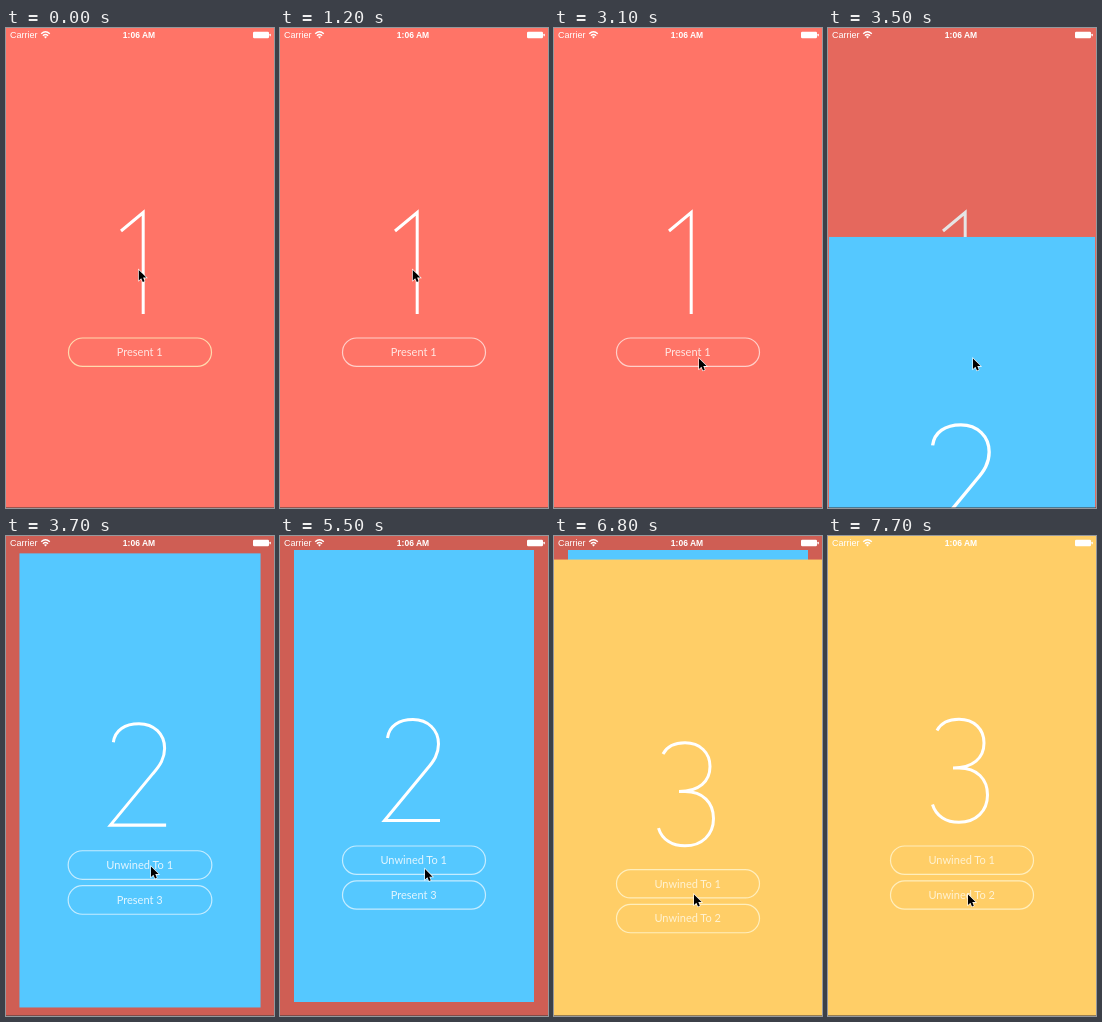
An HTML page for the animation above (8000 ms loop, 268 by 480 pixels).

```html
<!DOCTYPE html>
<html lang="en">
<head>
<meta charset="utf-8">
<title>Card transitions</title>
<style>
  html, body { margin: 0; width: 100%; height: 100%; overflow: hidden; background: #ff7467; }
  svg { display: block; width: 268px; height: 480px; }
  .label { font: 11px Lato, sans-serif; text-anchor: middle; }
  .digit { fill: none; stroke: #fff; stroke-width: 3; stroke-linejoin: miter; }
  .status { font: 9px "Liberation Sans", sans-serif; fill: #fff; }
  .clock { font-size: 8.5px; font-weight: bold; text-anchor: middle; }
  .pill { fill: none; stroke-width: 1.2; }
</style>
</head>
<body>
<svg viewBox="0 0 268 480">
  <rect width="268" height="480" fill="#ff7467"/>
  <g id="one">
    <path class="digit" d="M115 203L137.2 184.5V286"/>
  </g>
  <rect id="dim" width="268" height="480" opacity="0"/>
  <g id="two">
    <rect x="14" y="14" width="240" height="452" fill="#55c8ff"/>
    <path class="digit" d="M107.500 202C109 190 119 183.500 133 183.500C148 183.500 158.500 194 158.500 208C158.500 218 154 225 147 233L104.500 284.500H160"/>
  </g>
  <g id="three">
    <rect width="268" height="481" fill="#ffce67"/>
    <path class="digit" d="M109 194.500C113 187 121 183.300 131 183.300C146 183.300 156 193 156 207C156 222 145 232 125 232H131C149 232 159.500 243 159.500 259C159.500 275 148 286.300 131 286.300C118 286.300 108 280 104.500 268.500"/>
  </g>
  <g class="status">
    <text x="4" y="10">Carrier</text>
    <text class="clock" x="133" y="10">1:06 AM</text>
    <g fill="none" stroke="#fff" stroke-width="1.4">
      <path d="M35.200 5.800Q39.500 1.800 43.800 5.800M36.900 7.700Q39.500 5.300 42.100 7.700"/>
    </g>
    <path d="M38 8.800Q39.500 7.500 41 8.800L39.500 10.400Z"/>
    <rect x="247" y="3.700" width="16" height="6.600" rx="1.200"/>
    <rect x="263.500" y="5.700" width="1.300" height="2.600" rx=".6"/>
  </g>
  <rect y="479" width="268" height="1" fill="#443c3c" opacity=".55"/>
  <path id="cursor" d="M0 0V10.500L2.400 8.300L4 12L5.800 11.200L4.300 7.600H7.600Z" fill="#000" stroke="#fff" stroke-width="1.200" paint-order="stroke"/>
</svg>
<script>
const LOOP = 8000;
const $ = id => document.getElementById(id);
const [one, two, three, dim, cursor] = ['one', 'two', 'three', 'dim', 'cursor'].map($);

function make(parent, tag, attrs, text = '') {
  const el = document.createElementNS('http://www.w3.org/2000/svg', tag);
  for (const key in attrs) el.setAttribute(key, attrs[key]);
  el.textContent = text;
  return parent.appendChild(el);
}

function button(parent, y, text, line, ink) {
  make(parent, 'text', { class: 'label', x: 133.7, y: y + 18, fill: ink }, text);
  return make(parent, 'rect', {
    class: 'pill', x: 62.5, y, width: 143, height: 28.4, rx: 14.2, stroke: line
  });
}

const firstPill = button(one, 310, 'Present 1', '#ffcfc9', '#ffe6e2');
button(two, 310, 'Unwined To 1', '#c4ecff', '#e2f5ff');
button(two, 344.8, 'Present 3', '#c4ecff', '#e2f5ff');
button(three, 310, 'Unwined To 1', '#ffeebc', '#fff2d2');
button(three, 344.8, 'Unwined To 2', '#ffeebc', '#fff2d2');

// [time, x, y] of the pointer tip
const path = [
  [0, 132.8, 242], [1400, 132.8, 242], [1600, 134, 263], [1800, 137, 312],
  [2000, 139, 353], [2200, 138.6, 345.5], [2300, 142.5, 334], [2600, 145, 330.5],
  [5400, 145, 330.5], [5500, 145, 333], [5700, 143.5, 345], [6000, 140, 358.5],
  [LOOP, 140, 358.5]
];

function pointer(t) {
  const i = path.findIndex(p => p[0] > t);
  const [a, b] = [path[i - 1], path[i]];
  const k = (t - a[0]) / (b[0] - a[0]);
  return [a[1] + (b[1] - a[1]) * k, a[2] + (b[2] - a[2]) * k];
}

// Remaining distance of a spring, from 1 to 0
function spring(ms, speed, damping) {
  const x = Math.max(0, ms) / 1000 * speed;
  if (damping === 1) return (1 + x) * Math.exp(-x);
  const d = Math.sqrt(1 - damping * damping);
  return Math.exp(-damping * x) * (Math.cos(d * x) + damping / d * Math.sin(d * x));
}

const show = (el, on) => el.setAttribute('visibility', on ? 'visible' : 'hidden');

function draw(t) {
  const rest = spring(t - 3402, 17.3, 0.9);
  const done = 1 - rest;
  const scale = 1 + 28 / 240 * (1 - Math.min(1, done ** 4.37));
  show(two, t > 3402);
  two.setAttribute('transform',
    `translate(134 ${240 + 480 * rest}) scale(${scale}) translate(-134 -240)`);
  dim.setAttribute('opacity', 0.19 * done);

  show(three, t > 6540);
  three.setAttribute('transform', `translate(0 ${480 * spring(t - 6540, 18.26, 1)})`);

  // The first outline starts warm and cools down
  const cool = Math.min(1, t / 400);
  firstPill.setAttribute('stroke', `rgb(255 ${218 - 11 * cool} ${174 + 27 * cool})`);

  cursor.setAttribute('transform', `translate(${pointer(t)})`);
}

const start = performance.now();
function tick() {
  draw((performance.now() - start) % LOOP);
  requestAnimationFrame(tick);
}
tick();
</script>
</body>
</html>
```
